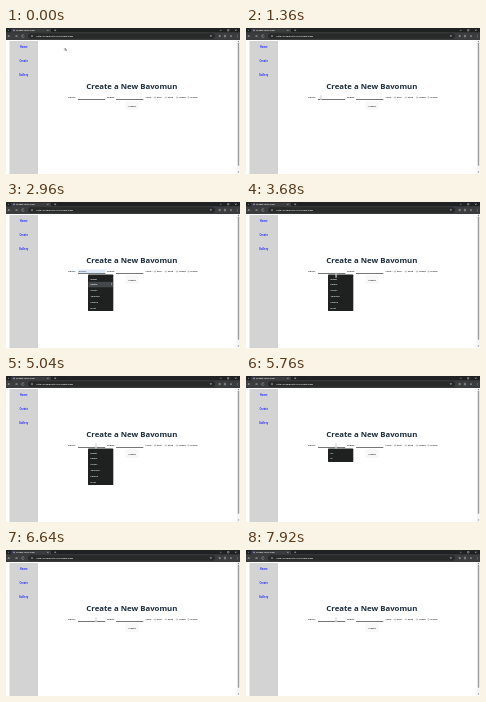
These frames come from a looping animation (234 px wide and 146 px high, 8 s). An HTML page:

```html
<!DOCTYPE html>
<html lang="en">
<head>
<meta charset="utf-8">
<title>Create form</title>
<style>
  html, body { margin: 0; width: 100%; height: 100%; overflow: hidden; background: #fff; }
  svg { display: block; width: 100vw; height: 100vh; }
  text { font-family: "Open Sans", "Noto Sans", sans-serif; font-size: 2.4px; font-weight: 600; fill: #0c1620; }
  .title { font-size: 7.8px; font-weight: 700; fill: #1b2c3b; }
  .link { fill: #2f35ff; font-weight: 700; font-size: 2.6px; text-anchor: middle; }
  .bar text { fill: #fff; font-size: 2.3px; }
  .icon { fill: none; stroke: #d4d4d4; stroke-width: .4; }
  .list text { fill: #fff; font-size: 2.3px; }
  .line { stroke: #555; stroke-width: .8; }
</style>
</head>
<body>
<svg viewBox="0 0 234 146" preserveAspectRatio="none">
  <rect width="234" height="146" fill="#fff"/>

  <rect x="3.5" y="13" width="28.5" height="133" fill="#d3d3d3"/>
  <text class="link" x="17.7" y="20">Home</text>
  <text class="link" x="17.7" y="33.9">Create</text>
  <text class="link" x="17.7" y="47.5">Gallery</text>

  <rect x="231" y="12" width="3" height="134" fill="#f5f5f5"/>
  <rect x="231.8" y="14.5" width="1.4" height="123.5" rx=".7" fill="#a0a0a0"/>
  <path d="M231.7 14l.8-1.2.8 1.2zM231.7 143.6l.8 1.2.8-1.2z" fill="#777"/>

  <g class="bar">
    <rect width="234" height="12" fill="#202122"/>
    <path d="M5 4.5V1.6q0-1 1-1h38q1 0 1 1v2.9z" fill="#3b3c3d"/>
    <rect y="4.2" width="234" height="7.8" fill="#3b3c3d"/>
    <rect x="22" y="5.2" width="187" height="5.6" rx="2.8" fill="#282929"/>
    <circle cx="2.5" cy="2.3" r=".6" fill="#777"/>
    <circle cx="8" cy="2.4" r=".8" fill="#a88be8"/>
    <text x="10" y="3.2">Create Your Own</text>
    <g class="icon">
      <path d="M41.2 1.7l1.3 1.3m0-1.3l-1.3 1.3M48.2 2.3h2m-1-1v2"/>
      <path d="M4.3 8.1H1.9m1-1l-1 1 1 1M9 8.1h2.4m-1-1l1 1-1 1"/>
      <path d="M18 7.5a1.2 1.2 0 1 0 .1 1"/>
      <path d="M213.8 2.3h1.8M221.5 1.5h1.5V3h-1.5zM229 1.5l1.5 1.5m0-1.5L229 3"/>
      <path d="M204.2 7.4l.7 1.4.7-1.4zM213 7.4h1.3v1.3H213zM218.4 7.2h1.2v1.8h-1.2z"/>
    </g>
    <circle cx="26" cy="8.1" r=".8" fill="#aaa"/>
    <circle cx="225" cy="8.1" r=".9" fill="#92979d"/>
    <path d="M231.3 6.9v.5m0 .5v.5m0 .5v.5" stroke="#ccc" stroke-width=".5"/>
    <text x="30.5" y="8.95">http://localhost:5173/create/new</text>
    <rect id="spark" x="57" y="8" width="1" height="1" fill="#eee" opacity="0"/>
  </g>

  <text class="title" x="80.3" y="60.9">Create a New Bavomun</text>

  <text x="62" y="70.3">Name:</text>
  <rect id="preview" x="72" y="67.6" width="27.3" height="3.7" fill="#dce8f5" opacity="0"/>
  <path class="line" d="M72 71.5h27.3M110 71.5h27.3"/>
  <text id="value" x="72.8" y="70.3" opacity="0">Ember</text>
  <text x="101" y="70.3">Speed:</text>
  <text x="139.5" y="70.3">Color:</text>
  <g fill="#fff" stroke="#555" stroke-width=".3">
    <circle cx="149" cy="69.5" r=".7"/><circle cx="160" cy="69.5" r=".7"/>
    <circle cx="171" cy="69.5" r=".7"/><circle cx="182.5" cy="69.5" r=".7"/>
  </g>
  <text x="151" y="70.3">Red</text>
  <text x="162" y="70.3">Blue</text>
  <text x="173" y="70.3">Green</text>
  <text x="184" y="70.3">Yellow</text>
  <rect x="119.3" y="73.3" width="13.4" height="8.8" rx="1.6" fill="#f8f8f8"/>
  <text x="126" y="78.6" text-anchor="middle">Create</text>
  <rect id="caret" x="72.5" y="68.6" width=".4" height="2.4" fill="#222" opacity="0"/>

  <g id="full" class="list" opacity="0">
    <rect x="82" y="72.5" width="25.3" height="36.6" rx=".7" fill="#1f2020"/>
    <rect id="hover" x="82.3" y="79.8" width="24.7" height="5.5" fill="#45484a" opacity="0"/>
  </g>
  <g id="short" class="list" opacity="0">
    <rect x="82" y="72.5" width="25.3" height="13.5" rx=".7" fill="#1f2020"/>
  </g>

  <g id="mouse">
    <path id="arrow" d="M0 0v2.4l.6-.5.45.95.4-.2-.45-.9h.75z" fill="#fff" stroke="#111" stroke-width=".35"/>
    <g id="beam" opacity="0">
      <path d="M0-.5v4.4" stroke="#fff" stroke-width="1.2"/>
      <path d="M-.5-.4h1M0-.4v3.2M-.5 2.8h1" stroke="#555" stroke-width=".3"/>
    </g>
  </g>
</svg>
<script>
const LOOP = 8000;
const $ = id => document.getElementById(id);

function play(id, frames) {
  $(id).animate(frames, { duration: LOOP, iterations: Infinity });
}

// Hard on/off changes: [time, opacity]
function steps(id, list) {
  const frames = list.map(([t, opacity]) => ({ offset: t / LOOP, opacity, easing: 'step-end' }));
  frames.push({ offset: 1, opacity: list[list.length - 1][1] });
  play(id, frames);
}

// Pointer path: [time, x, y]
function path(id, list) {
  play(id, list.map(([t, x, y]) => ({
    offset: t / LOOP, transform: `translate(${x}px, ${y}px)`, easing: 'ease-in-out'
  })));
}

function fillList(id, names) {
  names.forEach((name, i) => {
    const t = document.createElementNS('http://www.w3.org/2000/svg', 'text');
    t.setAttribute('x', 84.4);
    t.setAttribute('y', 77.6 + i * 5.8);
    t.textContent = name;
    $(id).append(t);
  });
}

fillList('full', ['Bright', 'Ember', 'Mossy', 'Thunder', 'Pebble', 'Frost']);
fillList('short', ['Ivy', 'Io']);

path('mouse', [
  [0, 58.8, 20], [80, 58.8, 20], [880, 91, 58], [1360, 75, 68.4],
  [2480, 75, 68.4], [2960, 105, 80.5], [3200, 104, 81],
  [3360, 104, 81], [3840, 86, 68.8], [4560, 86, 68.8],
  [4880, 90, 68.4], [LOOP, 90, 68.4]
]);
steps('arrow', [[0, 1], [1120, 0], [2640, 1], [3680, 0]]);
steps('beam', [[0, 0], [1120, 1], [1680, .5], [1840, 0], [3680, 1]]);
steps('full', [[0, 0], [1520, 1], [5760, 0]]);
steps('hover', [[0, 0], [2800, 1], [3520, 0]]);
steps('preview', [[0, 0], [2800, 1], [3520, 0]]);
steps('value', [[0, 0], [2800, .8], [3520, 0]]);
steps('caret', [[0, 0], [1520, 1], [2000, 0]]);

play('short', [
  { offset: 0, opacity: 0, easing: 'step-end' },
  { offset: 5760 / LOOP, opacity: 1 },
  { offset: 5840 / LOOP, opacity: 1 },
  { offset: 6320 / LOOP, opacity: 0 },
  { offset: 1, opacity: 0 }
]);

const blink = [[0, 0]];
for (let t = 4240, on = 1; t < LOOP; t += 400, on = 1 - on) {
  blink.push([t, on * .2], [t + 80, on * .4]);
}
steps('spark', blink);
</script>
</body>
</html>
```
